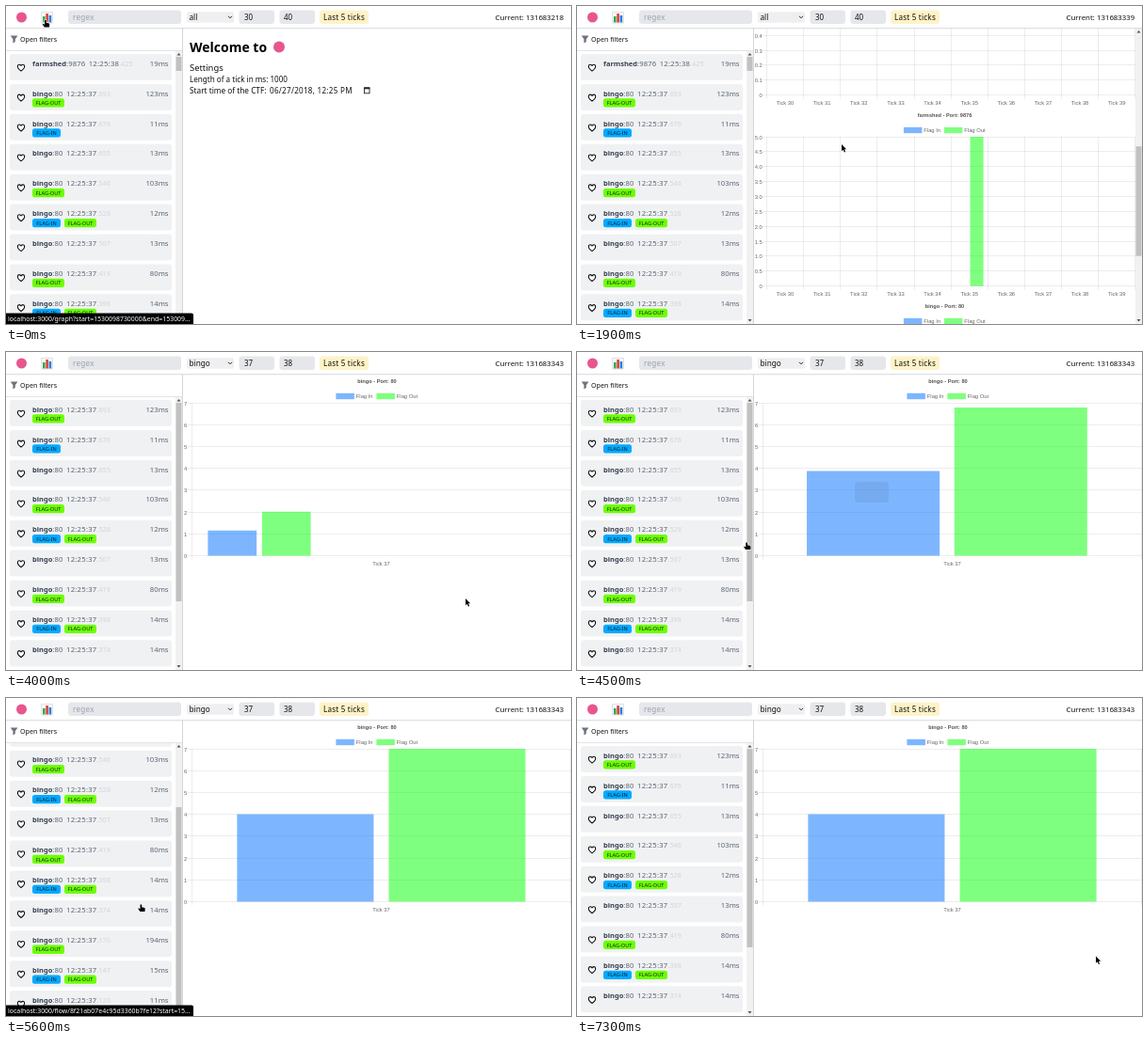
An HTML page with a canvas for the animation above (7400 ms loop, 600 by 338 pixels).

```html
<!DOCTYPE html>
<html lang="en">
<head>
<meta charset="utf-8">
<title>Flow viewer</title>
<style>
html, body { margin: 0; width: 100%; height: 100%; overflow: hidden; background: #fff; }
canvas { display: block; width: 600px; height: 338px; }
</style>
</head>
<body>
<canvas id="stage"></canvas>
<script>
const W = 600, H = 338, LOOP = 7400;
const canvas = document.getElementById('stage');
const dpr = window.devicePixelRatio || 1;
canvas.width = Math.round(W * dpr);
canvas.height = Math.round(H * dpr);
const c = canvas.getContext('2d');

const UI = '"Noto Sans", "Open Sans", sans-serif';
const PLOT = '"Liberation Sans", Arial, sans-serif';
const BLUE = 'rgba(0,112,255,.51)', GREEN = 'rgba(0,255,0,.5)';
const PINK = '#e8568f';

// Moments of the story
const OPEN_GRAPH = 100, PICK = 3800, ZOOM = 3920;

const clamp = x => Math.max(0, Math.min(1, x));
const ramp = (t, a, b) => clamp((t - a) / (b - a));
const smooth = x => x * x * (3 - 2 * x);
const mix = (a, b, k) => a + (b - a) * k;
const outQuart = x => 1 - Math.pow(1 - x, 4);

function text(s, x, y, size, color, { bold, family = UI, align = 'left', gap = 0 } = {}) {
  c.font = `${bold ? 'bold ' : ''}${size}px ${family}`;
  c.letterSpacing = gap + 'px';
  c.textAlign = align;
  c.fillStyle = color;
  c.fillText(s, x, y);
  return x + c.measureText(s).width;
}
function box(x, y, w, h, color, r = 0) {
  c.fillStyle = color;
  c.beginPath();
  c.roundRect(x, y, w, h, r);
  c.fill();
}
function disc(x, y, r, color) {
  c.fillStyle = color;
  c.beginPath();
  c.arc(x, y, r, 0, 7);
  c.fill();
}
function poly(points, color) {
  c.beginPath();
  for (let i = 0; i < points.length; i += 2) c.lineTo(points[i], points[i + 1]);
  c.closePath();
  c.fillStyle = color;
  c.fill();
}
function clipped(x, y, w, h, draw) {
  c.save();
  c.beginPath();
  c.rect(x, y, w, h);
  c.clip();
  draw();
  c.restore();
}

function scrollbar(x, top, thumbY, thumbH) {
  box(x, top, 7, H - top, '#f1f1f1');
  const m = x + 3.5;
  poly([m - 2, top + 4.5, m + 2, top + 4.5, m, top + 2], '#505050');
  poly([m - 2, 333, m + 2, 333, m, 335.5], '#505050');
  box(x + 0.5, thumbY, 6, thumbH, '#c1c1c1');
}

// ---- sidebar ----
// [milliseconds, duration, flags: i = in, o = out]
const bingo = [
  ['693', 123, 'o'], ['676', 11, 'i'], ['655', 13, ''], ['546', 103, 'o'],
  ['528', 12, 'io'], ['507', 13, ''], ['419', 80, 'o'], ['398', 14, 'io'],
  ['374', 14, ''], ['170', 194, 'o'], ['147', 15, 'io'], ['120', 11, '']
].map(([ms, took, flags]) => ({ name: 'bingo', port: 80, time: '12:25:37', ms, took, flags }));
const allFlows = [
  { name: 'farmshed', port: 9876, time: '12:25:38', ms: '425', took: 19, flags: '' },
  ...bingo
];

function heart(x, y) {
  c.beginPath();
  c.moveTo(x, y + 3.7);
  c.bezierCurveTo(x - 6.5, y - 0.8, x - 2.8, y - 5.4, x, y - 2);
  c.bezierCurveTo(x + 2.8, y - 5.4, x + 6.5, y - 0.8, x, y + 3.7);
  c.closePath();
  c.fillStyle = '#fff';
  c.fill();
  c.strokeStyle = '#111';
  c.lineWidth = 1.1;
  c.stroke();
}
function tag(x, y, label, color) {
  const w = label === 'FLAG-IN' ? 30 : 34;
  box(x, y, w, 9.3, color, 2.5);
  text(label, x + w / 2, y + 6.7, 5.6, '#111827', { align: 'center' });
  return x + w + 4;
}
function card(f, y) {
  const base = y + 12.7, slate = '#5b6472';
  box(4, y, 172, 28, '#f0f1f3', 3);
  heart(16, y + 14.4);
  let x = text(f.name, 28, base, 7.5, '#374151', { bold: true });
  x = text(':' + f.port, x, base, 7.7, slate, { gap: 0.1 });
  x = text(f.time, x + 3.5, base, 7.7, slate, { gap: 0.25 });
  text('.' + f.ms, x, base, 7.2, '#d1d5db');
  text(f.took + 'ms', 172.5, base, 7.7, slate, { align: 'right' });
  x = 28;
  if (f.flags.includes('i')) x = tag(x, y + 15.3, 'FLAG-IN', '#00aaff');
  if (f.flags.includes('o')) tag(x, y + 15.3, 'FLAG-OUT', '#6cff00');
}
function sidebar(t) {
  const picked = t >= PICK;
  const scroll = 91 * (smooth(ramp(t, 4720, 5500)) - smooth(ramp(t, 5600, 6000)));
  box(0, 24, 187, H - 24, '#fff');
  poly([4.8, 31.5, 12.4, 31.5, 9.8, 35.3, 9.8, 38, 7.4, 39.5, 7.4, 35.3], '#6b7280');
  text('Open filters', 15, 38, 7.1, '#111');
  clipped(0, 48, 187, H - 48, () => {
    (picked ? bingo : allFlows).forEach((f, i) => {
      const y = 51 + i * 31.92 - scroll;
      if (y < H) card(f, y);
    });
    scrollbar(180, 48, picked ? 54 + scroll * 0.68 : 54, picked ? 211 : 15);
  });
  box(0, 47, 187, 1, '#e2e4e8');
  box(187, 24, 1, H - 24, '#d4d6da');
}

// ---- right pane ----
function welcome() {
  text('Welcome to', 195, 48.5, 14, '#000', { bold: true });
  disc(290, 43.5, 6, PINK);
  text('Settings', 195, 68.5, 9.4, '#111');
  text('Length of a tick in ms: 1000', 195, 80.7, 8.1, '#111');
  text('Start time of the CTF:', 195, 92.5, 8.25, '#111');
  text('06/27/2018, 12:25 PM', 280, 92.5, 8.1, '#111', { gap: 0.27 });
  c.strokeStyle = '#222';
  c.lineWidth = 0.9;
  c.strokeRect(380.5, 87, 5.5, 5.8);
  box(380.2, 86.4, 6.1, 1.9, '#222');
}

function line(x1, y1, x2, y2) {
  c.strokeStyle = 'rgba(0,0,0,.07)';
  c.lineWidth = 1;
  c.beginPath();
  c.moveTo(x1, y1);
  c.lineTo(x2, y2);
  c.stroke();
}
const snap = v => Math.floor(v) + 0.5;

function legend(x, y, label, color) {
  box(x, y, 19.5, 6.4, color);
  text(label, x + 21.4, y + 5.2, 5.8, '#666', { family: PLOT });
}

// g: title, top, left, right, height, mid, max, step, first, count
function axes(g) {
  const grey = '#666', p = g.top + 54, bottom = p + g.height;
  text(g.title, g.mid, g.top + 33.1, 5.65, '#555', { bold: true, family: PLOT, align: 'center' });
  legend(g.mid - 43.6, g.top + 43.8, 'Flag In', BLUE);
  legend(g.mid - 0.6, g.top + 43.8, 'Flag Out', GREEN);

  const rows = Math.round(g.max / g.step);
  for (let i = 0; i <= rows; i++) {
    const y = snap(bottom - g.height * i / rows), v = i * g.step;
    line(g.left - 4, y, g.right, y);
    const label = i && g.step < 1 ? v.toFixed(1) : String(v);
    text(label, g.left - 4.7, y + 2, 5.8, grey, { family: PLOT, align: 'right' });
  }
  const slot = (g.right - g.left) / g.count;
  for (let i = 0; i <= g.count; i++) {
    const x = Math.min(snap(g.left + i * slot), 599.5);
    line(x, p, x, bottom + 4);
    if (i < g.count)
      text('Tick ' + (g.first + i), g.left + (i + 0.5) * slot, bottom + 10.3, 5.8, grey,
        { family: PLOT, align: 'center' });
  }
}
// Left edge and width of one bar inside its slot
function barSpan(g, index, series) {
  const slot = (g.right - g.left) / g.count, half = slot * 0.4;
  const w = half * 0.9;
  return [g.left + (index + 0.5) * slot + (series - 0.5) * half - w / 2, w];
}
function bar(g, span, series, value) {
  const h = g.height * value / g.max;
  box(span[0], g.top + 54 + g.height - h, span[1], h, series ? GREEN : BLUE);
}

// bars: [slot, series, value]
const charts = [
  { title: 'cloudbaker - Port: 5000', max: 1, step: 0.1, left: 201.5, bars: [] },
  { title: 'swap_up - Port: 8080', max: 1, step: 0.1, left: 201.5, bars: [] },
  { title: 'farmshed - Port: 9876', max: 5, step: 0.5, left: 201.5, bars: [[5, 1, 5]] },
  { title: 'bingo - Port: 80', max: 7, step: 1, left: 197.2,
    bars: [[6, 0, 1], [6, 1, 2], [7, 0, 4], [7, 1, 7]] }
].map(g => ({ ...g, right: 592.8, height: 158.7, mid: 390.5, first: 30, count: 10 }));
const single = { title: 'bingo - Port: 80', top: 0, left: 197, right: 600, height: 162.4,
  mid: 394, max: 7, step: 1, first: 37, count: 1 };

function allCharts(t) {
  const scroll = 321 * smooth(ramp(t, 1220, 1900)) + 176 * smooth(ramp(t, 2120, 2800));
  charts.forEach((chart, i) => {
    const g = { ...chart, top: 203 * i - scroll };
    if (g.top > H || g.top < -230) return;
    axes(g);
    g.bars.forEach(([slot, series, v]) => bar(g, barSpan(g, slot, series), series, v));
  });
  scrollbar(593, 24, 30 + scroll * 0.3714, 116.5);
}
function oneChart(t) {
  const k = outQuart(ramp(t, ZOOM, ZOOM + 1000));
  axes(single);
  [4, 7].forEach((v, series) => {
    const from = barSpan(charts[3], 0, series), to = barSpan(single, 0, series);
    bar(single, from.map((a, i) => mix(a, to[i], k)), series, v * k);
  });
  // Hover label on its way out
  const tip = 0.08 * ramp(t, 4650, 4450);
  if (tip > 0 && t > 4400) box(295, 138, 36, 22, `rgba(0,0,0,${tip})`, 3);
}

// ---- header ----
function header(t) {
  const picked = t >= PICK;
  box(0, 0, W, 23, '#fff');
  box(0, 23, W, 1, '#dfe1e5');
  box(0, 24, W, 1, 'rgba(0,0,0,.04)');
  disc(16.5, 12, 5.5, PINK);

  box(37, 6, 13, 12.5, '#d5dde3', 1);
  box(37.8, 6.8, 11.4, 10.9, '#f6f9fb');
  box(39, 11, 2.6, 6.5, '#35a853');
  box(42.3, 8, 2.6, 9.5, '#e0403a');
  box(45.6, 10, 2.6, 7.5, '#2f7fd6');

  const field = '#e5e7eb', ink = '#111';
  box(66, 4.5, 120, 14.5, field, 3);
  text('regex', 71, 14.7, 8.1, '#9ca3af', { gap: 0.25 });
  box(192, 6.3, 50, 11.4, '#efeff1', 2);
  text(picked ? 'bingo' : 'all', 194.5, 14.7, 8.2, ink);
  c.strokeStyle = '#222';
  c.lineWidth = 1;
  c.beginPath();
  c.moveTo(236, 10.8);
  c.lineTo(238, 12.8);
  c.lineTo(240, 10.8);
  c.stroke();
  box(247.5, 4.5, 37.5, 14.5, field, 3);
  text(picked ? '37' : '30', 253, 14.7, 8, ink);
  box(290.5, 4.5, 37.5, 14.5, field, 3);
  text(picked ? '38' : '40', 295, 14.7, 8, ink);
  box(333, 4.5, 52, 14.5, '#fef3c7', 3);
  text('Last 5 ticks', 359, 14.7, 8.1, ink, { align: 'center', gap: 0.2 });

  const now = t < OPEN_GRAPH ? 131683218 : t < ZOOM ? 131683339 : 131683343;
  text('Current: ' + now, 592.3, 14.6, 7.85, ink, { align: 'right' });
}

// ---- link preview and pointer ----
function linkBar(t) {
  const early = t < 3000;
  const shown = early ? ramp(t, 1150, 860)
    : Math.min(ramp(t, 4500, 4600), ramp(t, 6900, 6450));
  if (shown <= 0) return;
  const url = t < 620
    ? 'localhost:3000/graph?start=1530098730000&end=153009…'
    : `localhost:3000/flow/8f21ab07e4c95d3360b7fe${early ? '73' : '12'}?start=15…`;
  c.globalAlpha = shown ** 3;
  box(0, 326.5, 199, 11.5, '#000', [0, 2, 0, 0]);
  clipped(0, 326, 198, 12, () => text(url, 2, 334.6, 6.95, '#fff'));
  c.globalAlpha = 1;
}

// [time, x, y] of the pointer tip
const path = [
  [0, 42, 15], [480, 42, 15], [900, 281, 147], [3150, 281, 147], [3200, 304.5, 148],
  [3650, 488, 262], [4050, 488, 262], [4500, 180.5, 202.5], [4700, 143.5, 219.5],
  [6250, 143.5, 219.5], [7000, 584, 291], [7300, 551, 274.5], [LOOP, 551, 274.5]
];
function pointer(t) {
  const i = path.findIndex(p => p[0] > t);
  const a = path[i - 1], b = path[i];
  const k = ramp(t, a[0], b[0]);
  const x = mix(a[1], b[1], k), y = mix(a[2], b[2], k);
  const shape = x < 187
    ? [-1, 0, 0.6, 0, 0.9, 3, 3.2, 3.2, 4.2, 4, 4, 7.5, -1.2, 7.5, -3.2, 4.6, -2.6, 3.8, -1, 4.8]
    : [0, 0, 0, 7.3, 1.7, 5.8, 2.9, 8.5, 4.1, 8, 2.9, 5.3, 5.1, 5.2];
  c.save();
  c.translate(x, y);
  c.lineJoin = 'round';
  c.lineWidth = 1.2;
  c.strokeStyle = '#fff';
  poly(shape, '#000');
  c.stroke();
  poly(shape, '#000');
  c.restore();
}

function draw(t) {
  c.setTransform(dpr, 0, 0, dpr, 0, 0);
  box(0, 0, W, H, '#fff');
  clipped(188, 24, W - 188, H - 24, () => {
    if (t < OPEN_GRAPH) welcome();
    else if (t < ZOOM) allCharts(t);
    else oneChart(t);
  });
  sidebar(t);
  header(t);
  linkBar(t);
  pointer(t);
}

const start = performance.now();
function tick() {
  draw((performance.now() - start) % LOOP);
  requestAnimationFrame(tick);
}
tick();
</script>
</body>
</html>
```
